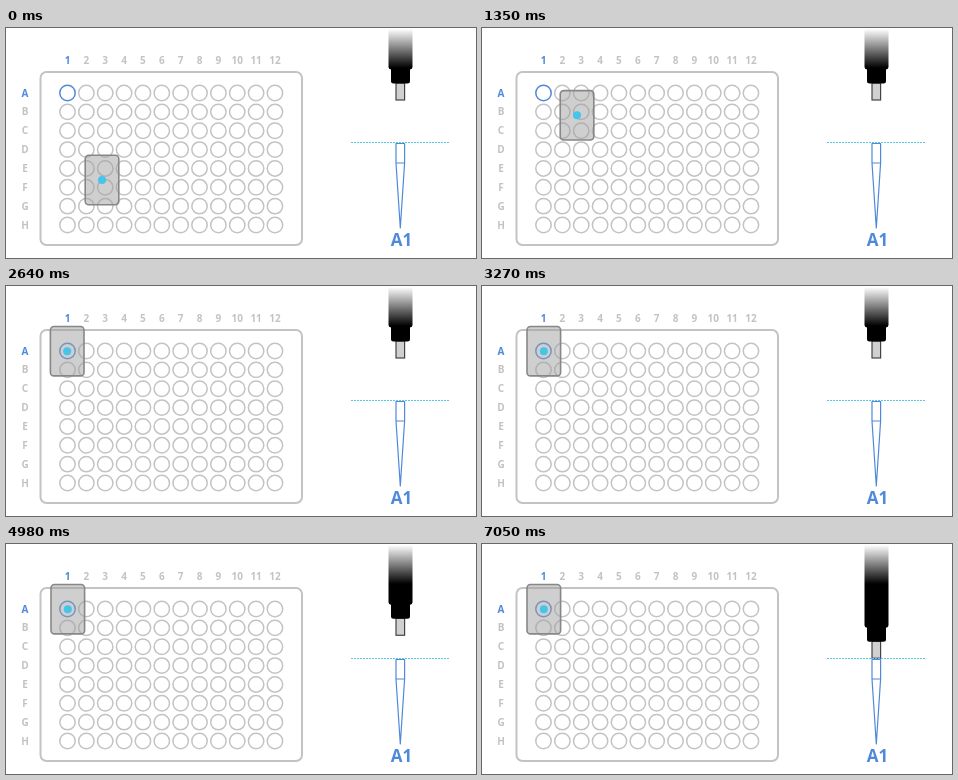
An HTML page that plays this animation: 470x230 px, repeating every 9000 ms.

```html
<!DOCTYPE html>
<html lang="en">
<head>
<meta charset="utf-8">
<title>Pipetting into well A1</title>
<style>
  html, body { margin: 0; width: 100%; height: 100%; overflow: hidden; background: #fff; }
  svg { display: block; width: 100%; height: 100%; }
  text { font: bold 10px "Open Sans", sans-serif; text-anchor: middle; fill: #c3c3c3; }
  .well { fill: none; stroke: #c3c3c3; stroke-width: 1.5; }
  .well.active { stroke: #5089da; }
  text.active { fill: #5089da; }
  .level { stroke: #55cbe0; stroke-dasharray: 2 1; }
</style>
</head>
<body>
<svg viewBox="0 0 470 230">
  <defs>
    <linearGradient id="fade" x2="0" y2="1">
      <stop offset="0.05" stop-color="#fff"/>
      <stop offset="1" stop-color="#fff" stop-opacity="0"/>
    </linearGradient>
  </defs>

  <rect x="34.5" y="44" width="261.5" height="173" rx="6" fill="#fff" stroke="#c3c3c3" stroke-width="2"/>
  <g id="plate"></g>

  <g id="cursor">
    <rect x="-16.8" y="-24.7" width="33.6" height="49.4" rx="3.5"
          fill="#a0a0a0" fill-opacity=".5" stroke="#878787" stroke-width="1.6"/>
    <circle r="4" fill="#45c5ea"/>
  </g>

  <g fill="none" stroke="#5089da" stroke-width="1.2" stroke-linejoin="round">
    <path d="M390 115.5H398.6V135L394.3 200L390 135ZM390 135H398.6"/>
  </g>
  <text class="active" x="395.5" y="218" style="font-size:17px">A1</text>

  <g id="pipette">
    <rect x="390" y="55" width="8.6" height="17" fill="#d0d0d0" stroke="#444" stroke-width="1.2"/>
    <path d="M382.5 -50H406.5V39Q406.5 41 404 41.5V53Q404 55.5 401.5 55.5H387.5Q385 55.5 385 53V41.5Q382.5 41 382.5 39Z"/>
  </g>
  <rect x="380" y="-1" width="29" height="41" fill="url(#fade)"/>

  <path class="level" d="M345 114.5H444"/>
  <g id="pulse"><path class="level" d="M-49.5 0H49.5"/></g>
</svg>

<script>
const LOOP = 9000;
const $ = id => document.getElementById(id);
const clamp = u => Math.min(1, Math.max(0, u));
const easeInOut = u => u < 0.5 ? 4 * u ** 3 : 1 - 4 * (1 - u) ** 3;

// Each key is [start, end, value]; the first key only sets the initial value.
function track(keys, t) {
  let value = keys[0][2];
  for (const [start, end, next] of keys.slice(1)) {
    value += (next - value) * easeInOut(clamp((t - start) / (end - start)));
  }
  return value;
}

const cursorX = [[0, 0, 96], [450, 1950, 94.7], [1950, 2730, 61], [2730, 3270, 61.8]];
const cursorY = [[0, 0, 152], [450, 1950, 65.2]];
const pipetteY = [
  [0, 0, 0], [4080, 5220, 20], [5220, 5370, 25.5],
  [5550, 5700, 31], [5850, 6000, 36.5], [6300, 6450, 42.2]
];

function buildPlate() {
  const colX = c => 61.5 + c * 18.86;
  const rowY = r => 65 + r * 18.86;
  const label = (x, y, text, active) =>
    `<text x="${x}" y="${y}" class="${active ? "active" : ""}">${text}</text>`;
  let markup = "";
  for (let c = 0; c < 12; c++) markup += label(colX(c), 36, c + 1, c === 0);
  for (let r = 0; r < 8; r++) {
    markup += label(19, rowY(r) + 3.5, "ABCDEFGH"[r], r === 0);
    for (let c = 0; c < 12; c++) {
      markup += `<circle class="well${r + c ? "" : " active"}" cx="${colX(c)}" cy="${rowY(r)}" r="7.7"/>`;
    }
  }
  $("plate").innerHTML = markup;
}

function draw(now) {
  const t = now % LOOP;
  $("cursor").setAttribute("transform", `translate(${track(cursorX, t)} ${track(cursorY, t)})`);
  $("pipette").setAttribute("transform", `translate(0 ${track(pipetteY, t)})`);

  // The level line sends out a widening, fading echo on contact.
  const u = clamp((t - 6420) / 630);
  $("pulse").setAttribute("transform", `translate(394.5 114.5) scale(${1 + 0.47 * u})`);
  $("pulse").setAttribute("opacity", u > 0 ? 1 - u : 0);
}

function tick() {
  draw(performance.now());
  requestAnimationFrame(tick);
}

buildPlate();
tick();
</script>
</body>
</html>
```
